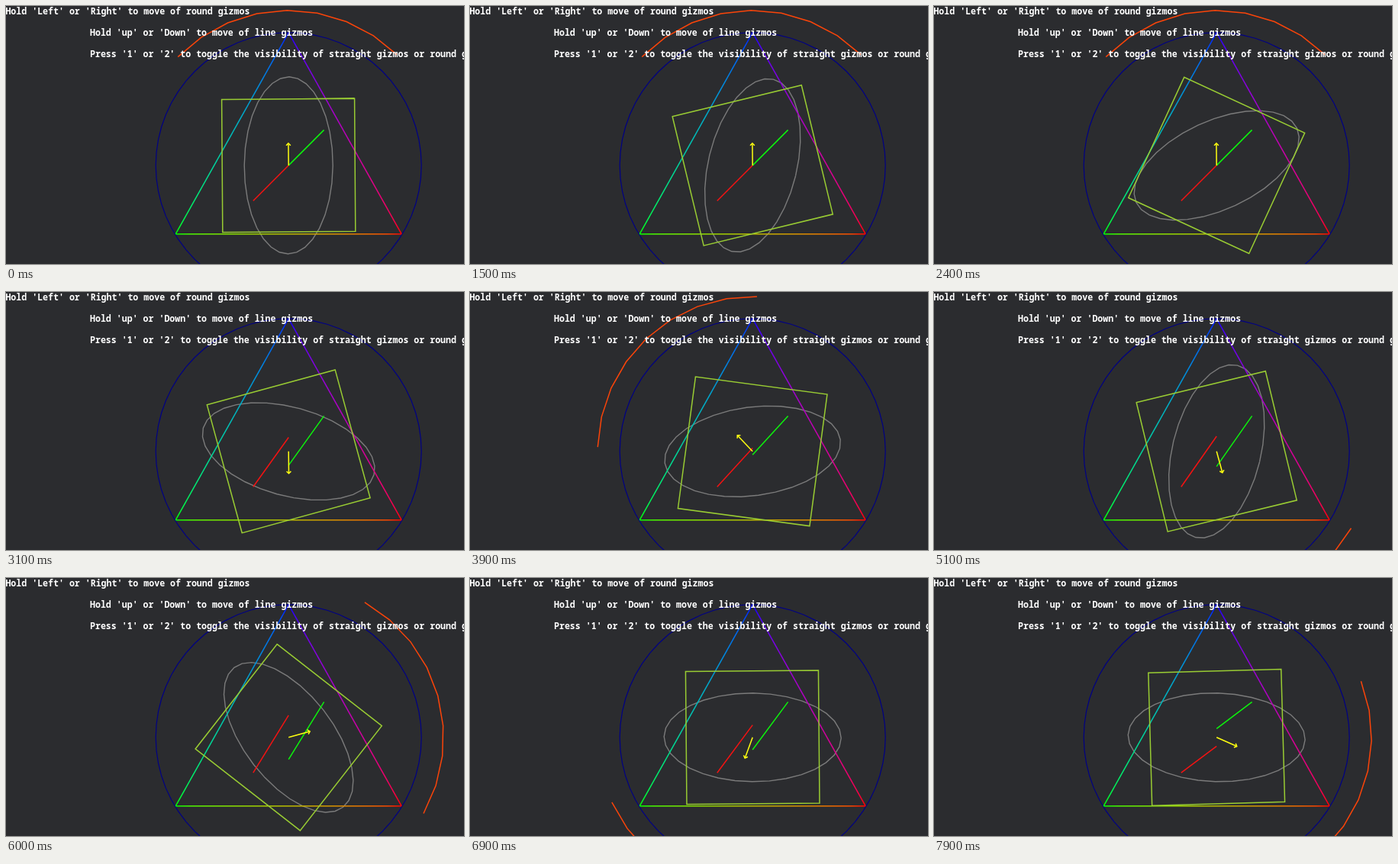
Write an HTML page with a canvas that moves like this. It is 600 by 338 pixels and loops after 8 s.

```html
<!DOCTYPE html>
<html lang="en">
<head>
<meta charset="utf-8">
<title>2D gizmos</title>
<style>
  html, body { margin: 0; width: 100%; height: 100%; overflow: hidden; background: #2b2c2f; }
  canvas, svg { position: absolute; left: 0; top: 0; width: 600px; height: 338px; }
  text { font: 600 11.6px "Noto Sans Mono", "DejaVu Sans Mono", monospace; fill: #fff; }
</style>
</head>
<body>
<canvas></canvas>
<svg viewBox="0 0 600 338">
  <text x="-0.6" y="10.8">Hold 'Left' or 'Right' to move of round gizmos</text>
  <text x="110" y="38.7">Hold 'up' or 'Down' to move of line gizmos</text>
  <text x="110" y="66.6">Press '1' or '2' to toggle the visibility of straight gizmos or round gizmos</text>
</svg>
<script>
const WIDTH = 600, HEIGHT = 338, LOOP = 8000, STEP = 100;
const CENTER = [370.2, 208.8], SCALE = 0.58, TAU = Math.PI * 2;

// [seconds, radians]: both clocks run at one radian per second while driven
const SPIN = [[0, .007], [1.269, .007], [3.28, 2.018], [3.32, 2.018],
              [7.34, -2.002], [7.441, -2.002], [8, -1.443]];
const SWING = [[0, .002], [2.42, .002], [3.208, .79], [3.262, .79],
               [4.061, -.009], [4.341, -.009], [8, 3.65]];

const canvas = document.querySelector('canvas');
const ctx = canvas.getContext('2d');
const ratio = window.devicePixelRatio || 1;
canvas.width = WIDTH * ratio;
canvas.height = HEIGHT * ratio;

function valueAt(track, t) {
  const i = Math.max(1, track.findIndex(([time]) => time >= t));
  const [t0, v0] = track[i - 1], [t1, v1] = track[i];
  return v0 + (v1 - v0) * (t - t0) / (t1 - t0);
}

// World space has its origin in the middle and y pointing up
const toScreen = ([x, y]) => [CENTER[0] + x * SCALE, CENTER[1] - y * SCALE];

const rotate = angle => ([x, y]) => [
  x * Math.cos(angle) - y * Math.sin(angle),
  x * Math.sin(angle) + y * Math.cos(angle)
];

function curve(rx, ry, from, sweep, segments) {
  return Array.from({ length: segments + 1 }, (_, i) => {
    const a = from + sweep * i / segments;
    return [rx * Math.cos(a), ry * Math.sin(a)];
  });
}

function strip(points, color, width = 1.5) {
  ctx.beginPath();
  points.map(toScreen).forEach(p => ctx.lineTo(...p));
  ctx.strokeStyle = color;
  ctx.lineWidth = width;
  ctx.stroke();
}

// Blends in linear light
function gradient(a, b, colorA, colorB) {
  const fill = ctx.createLinearGradient(...toScreen(a), ...toScreen(b));
  for (let k = 0; k <= 16; k++) {
    const mix = colorA.map((c, i) =>
      Math.round(255 * (c + (colorB[i] - c) * k / 16) ** (1 / 2.2)));
    fill.addColorStop(k / 16, `rgb(${mix})`);
  }
  return fill;
}

const corners = [
  [[0, 300], [0, 0, 1]],
  [[-255, -155], [0, 1, 0]],
  [[255, -155], [1, 0, 0]]
];
const edges = corners.map(([a, colorA], i) => {
  const [b, colorB] = corners[(i + 1) % 3];
  return { points: [a, b], paint: gradient(a, b, colorA, colorB) };
});
const square = [[-150, 150], [150, 150], [150, -150], [-150, -150], [-150, 150], [150, 150]];
const ellipse = curve(100, 200, 0, TAU, 32);
const ring = curve(300, 300, 0, TAU, 64);
const arrow = [[0, 0], [50, 0]];
const arrowHead = [[45, 5], [50, 0], [45, -5]];

function draw(t) {
  const spin = valueAt(SPIN, t);
  const lift = Math.sin(valueAt(SWING, t));
  const turn = lift * 5 + Math.PI / 2;

  ctx.setTransform(ratio, 0, 0, ratio, 0, 0);
  ctx.fillStyle = '#2b2c2f';
  ctx.fillRect(0, 0, WIDTH, HEIGHT);

  strip(ring, '#000084', 1.2);
  strip(ellipse.map(rotate(-spin)), '#7b7b7b', 1.4);
  strip(curve(350, 350, turn - Math.PI / 4, Math.PI / 2, 8), '#fb4409');

  edges.forEach(({ points, paint }) => strip(points, paint));
  strip(square.map(rotate(spin)), '#99cc33');
  strip([[0, lift * 50], [-80, -80]], '#f51212');
  strip([[0, lift * -50], [80, 80]], '#0cf50c');
  strip(arrow.map(rotate(turn)), '#ffff10');
  strip(arrowHead.map(rotate(turn)), '#ffff10');
}

const start = performance.now();
function tick() {
  const elapsed = (performance.now() - start) % LOOP;
  draw(Math.floor(elapsed / STEP) * STEP / 1000);
  requestAnimationFrame(tick);
}
tick();
</script>
</body>
</html>
```
